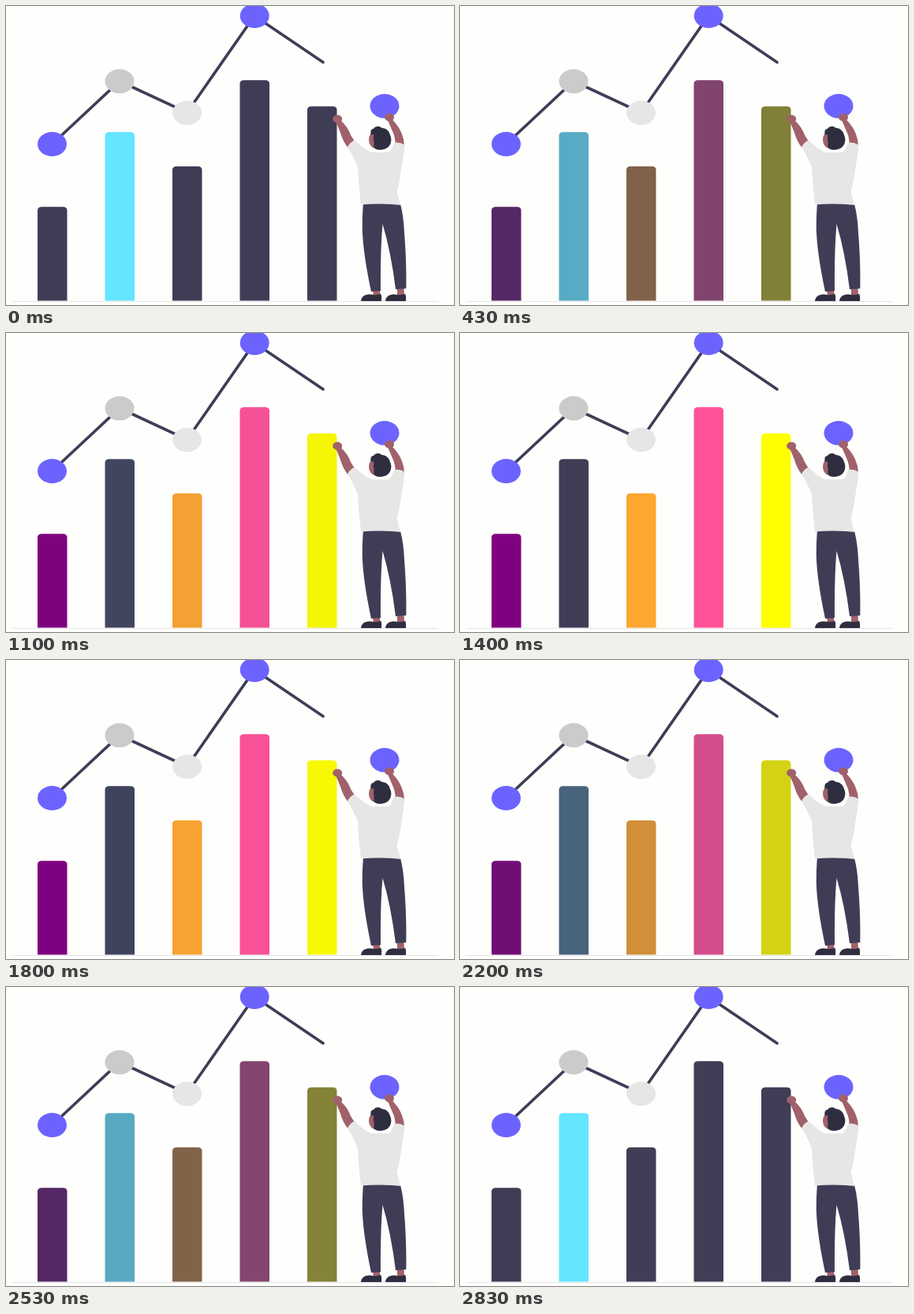
An HTML page that plays this animation: 568 px wide and 380 px high, repeating every 3.7 s.

```html
<!DOCTYPE html>
<html lang="en">
<head>
<meta charset="utf-8">
<title>Bar chart</title>
<style>
  html, body { margin: 0; width: 100%; height: 100%; overflow: hidden; background: #fefefd; }
  svg { display: block; }
  .ink { fill: #3f3d56; }
  .dark { fill: #2f2e41; }
  .skin { fill: #a0616a; }
  .pale { fill: #e6e6e6; }
  .accent { fill: #6c63ff; }
</style>
</head>
<body>
<svg width="568" height="380" viewBox="0 0 568 380">
  <path d="M8 375.5H548" stroke="#e4e4e6" stroke-width="1.2"/>
  <g id="bars"></g>

  <path d="M58.5 175.5L144 95.5L229.5 135.5L315 12.5L402 71.5" fill="none" stroke="#3f3d56" stroke-width="3.6" stroke-linecap="round"/>
  <g id="dots"></g>

  <g id="person">
    <path class="skin" d="M465.500 360h8.500l.5 9h-9zM496 357h8.500l.5 12h-9z"/>
    <path class="dark" d="M450 375C450.500 369 455 366.500 462 366.500Q469 368 475.500 366Q476.800 370 476 375ZM481 375C481.500 369 486 366.500 493 366.500Q500 368 506.300 366Q507.800 370 507 375Z"/>
    <path class="ink" d="M453 250L500 252Q504 266 505 288Q508 326 507.300 359L494 360Q488 312 477.500 277Q474.500 310 475 362L463 363Q453 316 451.800 285Q451.500 268 453 250Z"/>
    <path class="skin" d="M417.500 146L424.500 145.500Q433 153 437 164L442 172L433.500 180Q427 172 424 161Q421 153 417.500 146Z"/>
    <path class="skin" d="M484 145L489.500 144Q499 154 502 163Q505 170 505 178L493.500 176Q494 167 489.500 158Z"/>
    <ellipse class="skin" cx="420.200" cy="143.500" rx="6" ry="5"/>
    <ellipse class="skin" cx="486" cy="141.500" rx="6" ry="5"/>
    <path class="pale" d="M442 170.500Q452 181 463 186H485Q489 183 492 174Q498 172 505.500 176.500Q504 192 501 208Q499 224 495.500 236Q498 244 500 253Q476 250.500 450 252.500Q447 228 446 205Q440 190 433 179.500Q436 173 442 170.500Z"/>
    <ellipse class="skin" cx="468.500" cy="170" rx="8.500" ry="11"/>
    <path class="dark" d="M463 164C461.500 159 463 156 466 156C468 152.500 473 152 476.500 155C482 155 486 159 487 164C490 170 488 178 482 181C477 183.500 470 183.500 467 180.500C465.500 177 467.500 174 466 170C465.500 167 467 165 466 163Z"/>
  </g>
</svg>
<script>
const LOOP = 3700, START = 130, PEAK = 1485, END = 2840;
const INK = [63, 61, 86];
// x, top, resting colour, peak colour
const BARS = [
  [40, 255.3, INK, [128, 0, 128]],
  [125.5, 160.3, [101, 229, 255], INK],
  [211, 203.7, INK, [253, 166, 48]],
  [296.5, 94.2, INK, [255, 82, 153]],
  [382, 127.4, INK, [255, 255, 0]]
];
const DOTS = [
  [58.5, 175.5, 'accent'],
  [144, 95.7, ''],
  [229.6, 135.7, 'pale'],
  [315.2, 12.5, 'accent'],
  [480, 127.2, 'accent']
];

function add(parent, tag, attrs) {
  const el = document.createElementNS('http://www.w3.org/2000/svg', tag);
  for (const key in attrs) el.setAttribute(key, attrs[key]);
  return parent.appendChild(el);
}

const bars = document.getElementById('bars');
const dots = document.getElementById('dots');
const rects = BARS.map(([x, y]) => add(bars, 'path', {
  d: `M${x} 374.600V${y + 4.5}q0 -4.500 5.500 -4.500h26.500q5.500 0 5.500 4.500V374.600Z`
}));
for (const [cx, cy, cls] of DOTS) {
  add(dots, 'ellipse', { cx, cy, rx: 18.5, ry: 15.4, class: cls, fill: '#cbcbcb' });
}
// The last ball is held, so the person's hand sits over it.
document.querySelector('svg').append(document.getElementById('person'));

const bezier = (a, b, s) => 3 * a * s * (1 - s) ** 2 + 3 * b * s * s * (1 - s) + s ** 3;

// cubic-bezier(.25, .1, .25, 1)
function ease(x) {
  if (x <= 0) return 0;
  if (x >= 1) return 1;
  let lo = 0, hi = 1;
  for (let i = 0; i < 24; i++) {
    const mid = (lo + hi) / 2;
    if (bezier(0.25, 0.25, mid) < x) lo = mid; else hi = mid;
  }
  return bezier(0.1, 1, lo);
}

function draw(now) {
  const t = now % LOOP;
  const p = ease(t < PEAK ? (t - START) / (PEAK - START) : (END - t) / (END - PEAK));
  BARS.forEach(([, , from, to], i) => {
    const rgb = from.map((c, k) => Math.round(c + (to[k] - c) * p));
    rects[i].setAttribute('fill', `rgb(${rgb})`);
  });
}

function tick() {
  draw(performance.now());
  requestAnimationFrame(tick);
}
tick();
</script>
</body>
</html>
```
